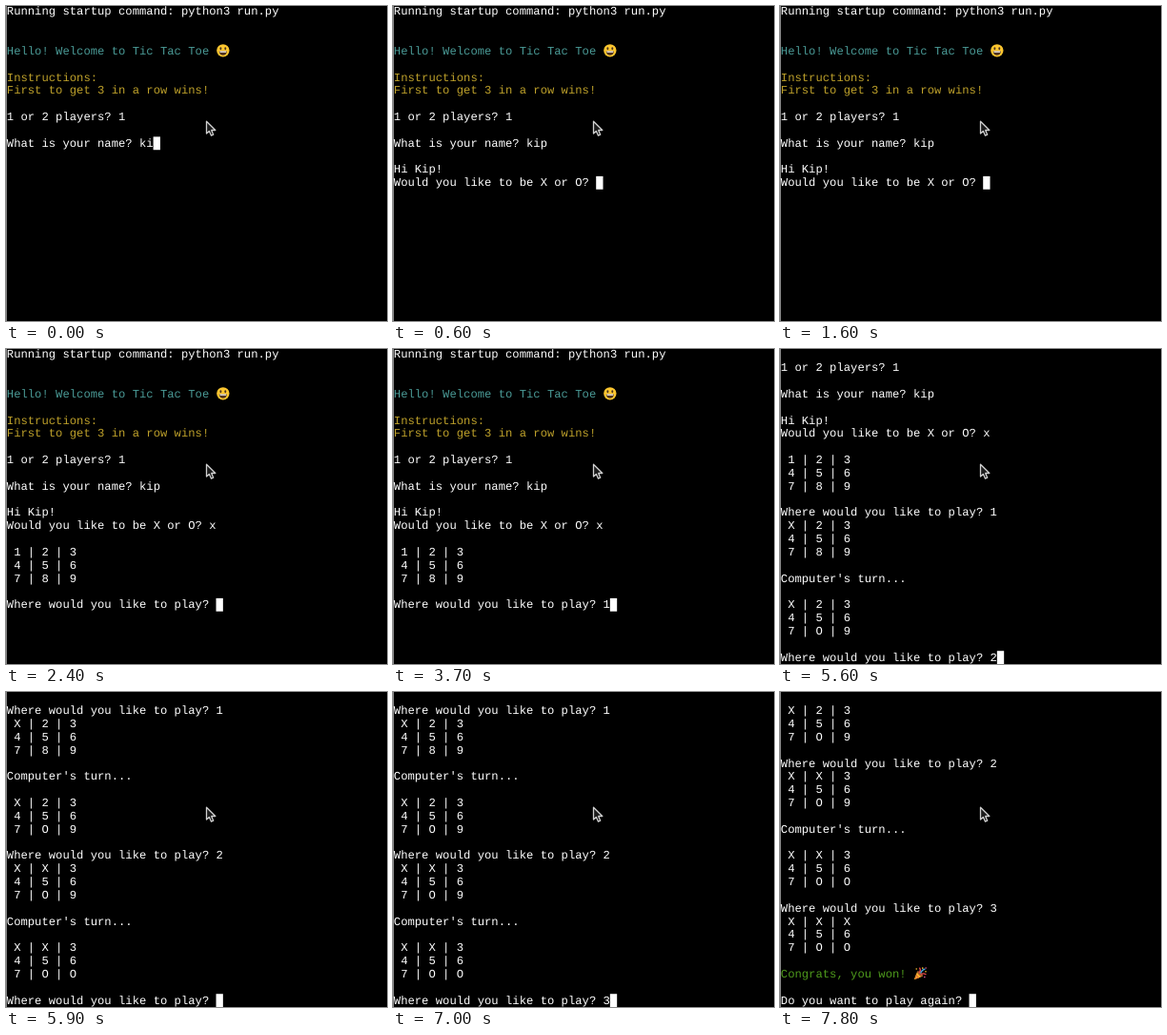
An HTML page for the animation above (8 s loop, 400 by 331 pixels).

```html
<!DOCTYPE html>
<html lang="en">
<head>
<meta charset="utf-8">
<title>Tic Tac Toe terminal</title>
<style>
  html, body { margin: 0; width: 100%; height: 100%; overflow: hidden; background: #000; }
  #stage { position: relative; width: 400px; height: 331px; overflow: hidden; background: #000; }
  #edge { position: absolute; left: 0; top: 0; width: 1px; height: 331px; background: #858585; }
  /* 9 x 17 px cells, shown at a reduced size */
  #term {
    position: absolute; left: 0; top: 0; width: 490px;
    transform: translate(.8px, -.4px) scale(.8138); transform-origin: 0 0;
    font: 15px/17px "Liberation Mono", monospace;
    text-rendering: geometricPrecision; font-variant-ligatures: none;
    white-space: pre; color: #fff;
  }
  .row { height: 17px; }
  .row i { font-style: normal; }
  .cyan { color: #4a9a96; }
  .gold { color: #bda02a; }
  .green { color: #4e9a1c; }
  .caret {
    display: inline-block; width: 9px; height: 17px; background: #fff;
    vertical-align: top; transform: translateY(-.7px);
  }
  .emoji { position: absolute; width: 18px; height: 18px; margin-top: -2px; }
  #pointer { position: absolute; left: 208px; top: 119px; }
</style>
</head>
<body>
<div id="stage">
  <div id="edge"></div>
  <div id="term"></div>
  <svg id="pointer" width="16" height="20" viewBox="0 0 16 20">
    <path d="M2.5 2.2V15L5.4 12.4L7.5 17.2L9.7 16.2L7.7 11.5H11.8Z"
      fill="#1c1c1c" stroke="#d0d0d0" stroke-width="1.3" stroke-linejoin="round"/>
  </svg>
</div>
<script>
const LOOP = 8000, ROWS = 24;

const emoji = shapes =>
  `<svg class="emoji" viewBox="0 0 18 18">${shapes.replace(/\n\s*/g, "")}</svg>`;
const smile = emoji(`
  <circle cx="9" cy="9" r="8.2" fill="#fcc62f"/>
  <ellipse cx="6" cy="6.4" rx="1.2" ry="1.8" fill="#4a3320"/>
  <ellipse cx="12" cy="6.4" rx="1.2" ry="1.8" fill="#4a3320"/>
  <path d="M3.8 9.8H14.2Q13.4 15 9 15T3.8 9.8Z" fill="#50331f"/>
  <path d="M4.6 9.8H13.4L13 11.4H5Z" fill="#fff"/>`);
const popper = emoji(`
  <path d="M1 17L5.2 6.2Q10 8 12 12.6Z" fill="#fbb42c"/>
  <path d="M3.4 11L7 14.8M2.2 14L4.2 15.8" stroke="#e2653a" stroke-width="1.3"/>
  <ellipse cx="8.6" cy="9.4" rx="1.9" ry="4.5" transform="rotate(-45 8.6 9.4)" fill="#a8582c"/>
  <path d="M8 8Q10.4 5 8 1.4M10 10Q13 8 16.6 10.4" fill="none" stroke="#e8474c" stroke-width="1.6"/>
  <path d="M9.4 8.6Q11.4 3.6 15.4 3.4" fill="none" stroke="#45a6e0" stroke-width="1.6"/>
  <g fill="#fbc62f"><circle cx="4" cy="3" r="1"/><circle cx="12" cy="2" r="1"/><circle cx="16" cy="6.6" r="1"/></g>
  <g fill="#e85c9a"><circle cx="14.6" cy="13.6" r="1"/><circle cx="16.2" cy="1.8" r=".9"/></g>`);

const tint = (name, text) => `<i class="${name}">${text}</i>`;
const board = cells => [0, 3, 6]
  .map(i => " " + [...cells.slice(i, i + 3)].join(" | ") + "\n").join("");
const ask = "\nWhere would you like to play? ";
const turn = "\nComputer's turn...\n\n";

// [time in ms, text written to the terminal]
const output = [
  [0, "Running startup command: python3 run.py\n\n\n"
    + tint("cyan", "Hello! Welcome to Tic Tac Toe " + smile) + "\n\n"
    + tint("gold", "Instructions:") + "\n"
    + tint("gold", "First to get 3 in a row wins!") + "\n\n"
    + "1 or 2 players? 1\n\nWhat is your name? ki"],
  [400, "p"],
  [600, "\n\nHi Kip!\nWould you like to be X or O? "],
  [2100, "x"],
  [2400, "\n\n" + board("123456789") + ask],
  [3700, "1"],
  [3900, "\n" + board("X23456789") + turn + board("X234567O9") + ask],
  [5600, "2"],
  [5800, "\n" + board("XX34567O9") + turn],
  [5900, board("XX34567OO") + ask],
  [7000, "3"],
  [7300, "\n" + board("XXX4567OO") + "\n"
    + tint("green", "Congrats, you won! " + popper) + "\n\n"
    + "Do you want to play again? "],
];

const term = document.getElementById("term");
let shown = 0;

function draw(time) {
  const count = output.filter(([at]) => at <= time).length;
  if (count === shown) return;
  shown = count;
  const text = output.slice(0, count).map(([, part]) => part).join("");
  const rows = (text + '<span class="caret"></span>').split("\n").slice(-ROWS);
  term.innerHTML = rows.map(row => `<div class="row">${row}</div>`).join("");
}

const start = performance.now();
function tick() {
  draw((performance.now() - start) % LOOP);
  requestAnimationFrame(tick);
}
tick();
</script>
</body>
</html>
```
